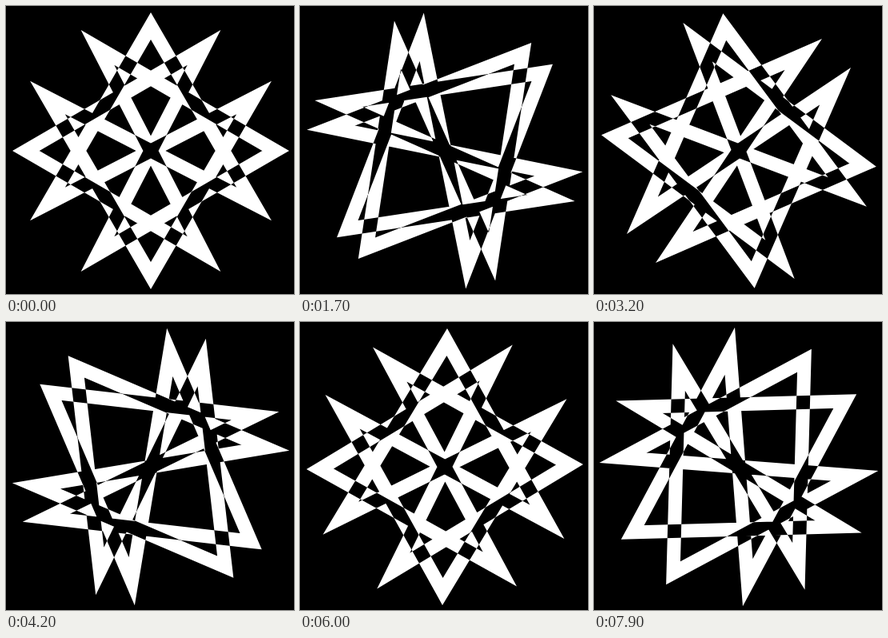
An HTML page with a canvas for the animation above (8000 ms loop, 360 px wide and 360 px high).

```html
<!DOCTYPE html>
<html lang="en">
<head>
<meta charset="utf-8">
<title>Rotating knots</title>
<style>
  html, body { margin: 0; width: 100%; height: 100%; overflow: hidden; background: #000; }
  canvas { display: block; }
</style>
</head>
<body>
<canvas id="stage" width="360" height="360"></canvas>
<script>
const ctx = document.getElementById('stage').getContext('2d');
const LOOP = 8000, STEP = 100, TURN = 3.0165; // ms, ms, degrees per step

// Closed six-point line that crosses itself at the stage centre
const knot = new Path2D('M0 -156L129 66.5L-129 -66.5L0 156L129 -66.5L-129 66.5Z');

function drawKnot(degrees) {
  ctx.save();
  ctx.translate(181, 181);
  ctx.rotate(degrees * Math.PI / 180);
  ctx.stroke(knot);
  ctx.restore();
}

function draw(time) {
  const angle = Math.floor(time % LOOP / STEP) * TURN;
  ctx.clearRect(0, 0, 360, 360);
  ctx.globalCompositeOperation = 'xor'; // the two knots cancel where they overlap
  ctx.strokeStyle = '#fff';
  ctx.lineWidth = 17;
  ctx.lineJoin = 'miter';
  ctx.miterLimit = 10;
  drawKnot(angle);
  drawKnot(90 - angle);
}

const start = performance.now();
function tick() {
  draw(performance.now() - start);
  requestAnimationFrame(tick);
}
tick();
</script>
</body>
</html>
```
